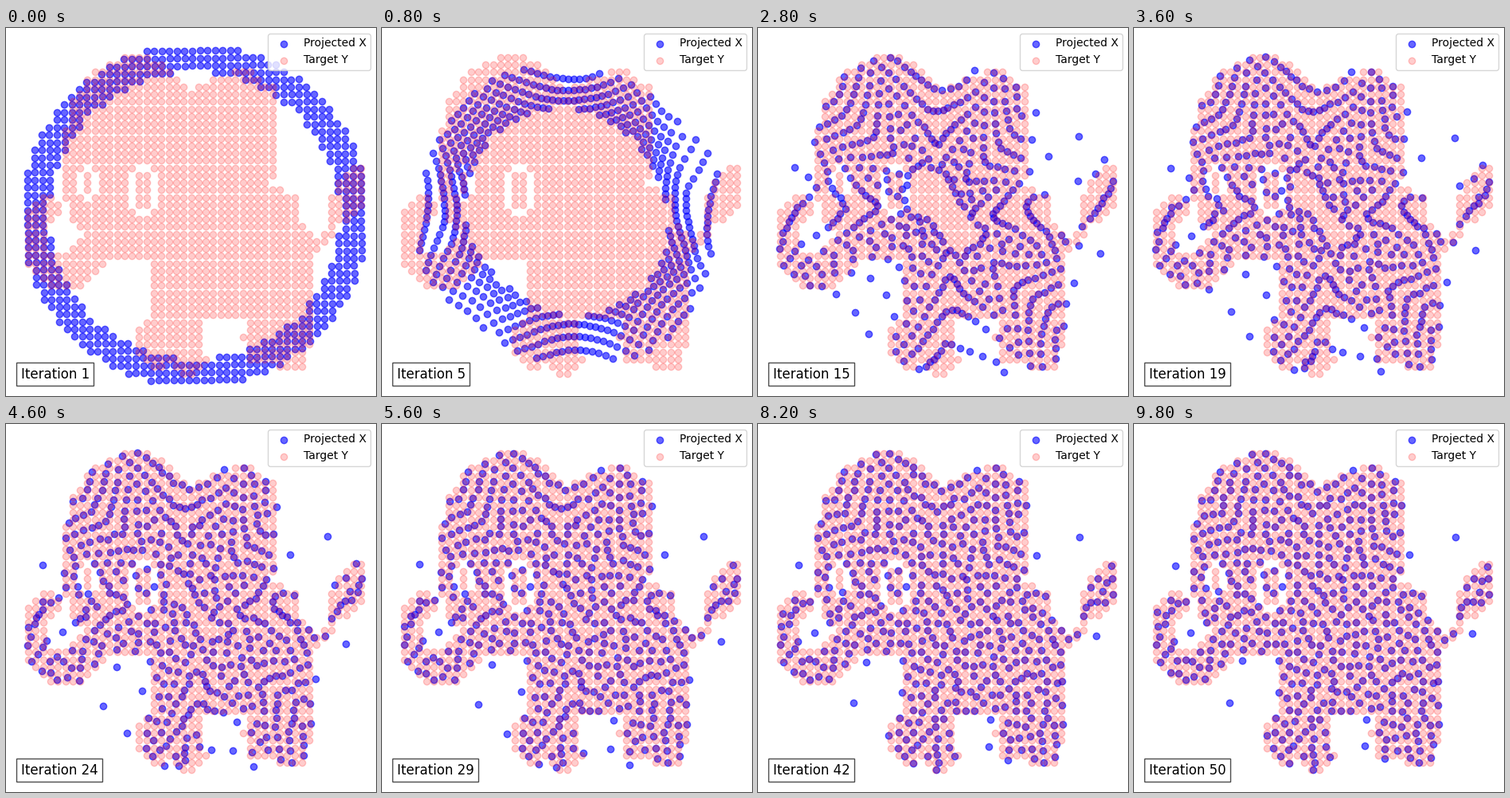
Recreate the animation shown at these times as a matplotlib script. Size 465 by 462 pixels, loop 10 s.

```python
import numpy as np
import matplotlib.pyplot as plt
from matplotlib.animation import FuncAnimation
from matplotlib.path import Path

W, H, DPI = 465, 462, 100
FRAMES, INTERVAL = 50, 200
DIRECTIONS = 100
RAMP, TOP_SPEED = 0.19, 3.0   # the flow speeds up, then keeps its pace

COL, ROW = np.meshgrid(np.arange(46), np.arange(44))
CELLS = np.column_stack([COL.ravel(), ROW.ravel()])


def polygon(*points):
    """Cells inside the outline, its border included."""
    path = Path(points + points[:1])
    inside = [path.contains_points(CELLS + (dx, dy))
              for dx in (-0.15, 0.15) for dy in (-0.15, 0.15)]
    return np.any(inside, axis=0).reshape(COL.shape)


def ellipse(cx, cy, a, b):
    return ((COL - cx) / a) ** 2 + ((ROW - cy) / b) ** 2


def stroke(radius, *points):
    """Cells within a distance of a polyline."""
    mask = np.zeros(COL.shape, bool)
    for (x0, y0), (x1, y1) in zip(points, points[1:]):
        dx, dy = x1 - x0, y1 - y0
        t = ((COL - x0) * dx + (ROW - y0) * dy) / (dx * dx + dy * dy)
        t = np.clip(t, 0, 1)
        mask |= np.hypot(COL - x0 - t * dx, ROW - y0 - t * dy) <= radius
    return mask


def elephant():
    head = ellipse(14.35, 11, 9.4, 11.2) <= 1
    body = polygon(
        (23, 4), (28, 2), (30, 2), (33, 4), (33, 16), (32, 17), (36, 19),
        (36, 21), (38, 24), (38, 39), (37, 42), (34, 42), (30, 41), (29, 38),
        (30, 36), (29, 35), (24, 35), (23, 36), (24, 41), (22, 43), (21, 43),
        (19, 41), (18, 42), (17, 42), (15, 40), (15, 37), (17, 34), (17, 27),
        (3, 27), (6, 26), (8, 24), (6, 22), (5, 19), (5, 11), (7, 5), (23, 5))
    trunk = stroke(1.6, (2.7, 20.3), (1, 22), (1, 27), (3.5, 29.55),
                   (6.5, 29.55), (9.5, 27.3))
    tail = stroke(0.6, (41, 23), (39, 26))
    tuft = polygon((45, 15), (44, 15), (42, 17), (41, 19), (41, 22), (43, 22),
                   (45, 20))
    mask = head | body | trunk | tail | tuft
    for eye in (ellipse(8, 17, 1, 2), ellipse(15.5, 18, 1.6, 3)):
        mask &= (eye < 0.8) | (eye > 1.4)
    return np.column_stack([28.13 + 9.29 * COL[mask],
                            36.85 + 9.245 * ROW[mask]])


def ring(tilt=0.013):
    k = np.arange(-22, 23)
    gx, gy = (g.ravel() for g in np.meshgrid(k, k))
    r2 = gx ** 2 + gy ** 2
    keep = (r2 >= 367) & (r2 <= 525)
    x, y = 9.52 * gx[keep], 9.39 * gy[keep]
    return np.column_stack([236.7 + x + tilt * y, 235.2 + y - tilt * x])


def sliced_flow(start, goal):
    """Positions of the moving cloud at every iteration."""
    angles = np.pi * np.arange(DIRECTIONS) / DIRECTIONS
    dirs = np.array([np.cos(angles), np.sin(angles)])
    n, m = len(start), len(goal)
    q = (np.arange(n) + 0.5) / n
    p = (np.arange(m) + 0.5) / m
    quantiles = np.column_stack(
        [np.interp(q, p, col) for col in np.sort(goal @ dirs, axis=0).T])

    def move(pos, step):
        proj = pos @ dirs
        order = np.argsort(proj, axis=0, kind="stable")
        shift = np.empty_like(proj)
        np.put_along_axis(shift, order, quantiles, axis=0)
        return pos + step * (shift - proj) @ dirs.T / DIRECTIONS

    path = [start]
    for k in range(1, FRAMES):
        half = min(RAMP * k, TOP_SPEED) / 2
        path.append(move(move(path[-1], half), half))
    return path


target = elephant()
path = sliced_flow(ring(), target)

fig = plt.figure(figsize=(W / DPI, H / DPI), dpi=DPI, facecolor="white")
ax = fig.add_axes([0, 0, 1, 1])
ax.set_xlim(0, W)
ax.set_ylim(H, 0)
ax.axis("off")

cloud = ax.scatter(*path[0].T, color="blue", alpha=0.6, label="Projected X")
ax.scatter(*target.T, color="red", alpha=0.2, label="Target Y")
ax.legend(loc="upper right", fontsize=10)
label = ax.text(18.6, 443.7, "", fontsize=12, va="bottom", zorder=6,
                bbox=dict(facecolor="white", alpha=0.7))


def draw(i):
    cloud.set_offsets(path[i])
    label.set_text(f"Iteration {i + 1}")
    return cloud, label


anim = FuncAnimation(fig, draw, frames=FRAMES, interval=INTERVAL,
                     init_func=lambda: draw(0), repeat=True, repeat_delay=0)
plt.show()
```
